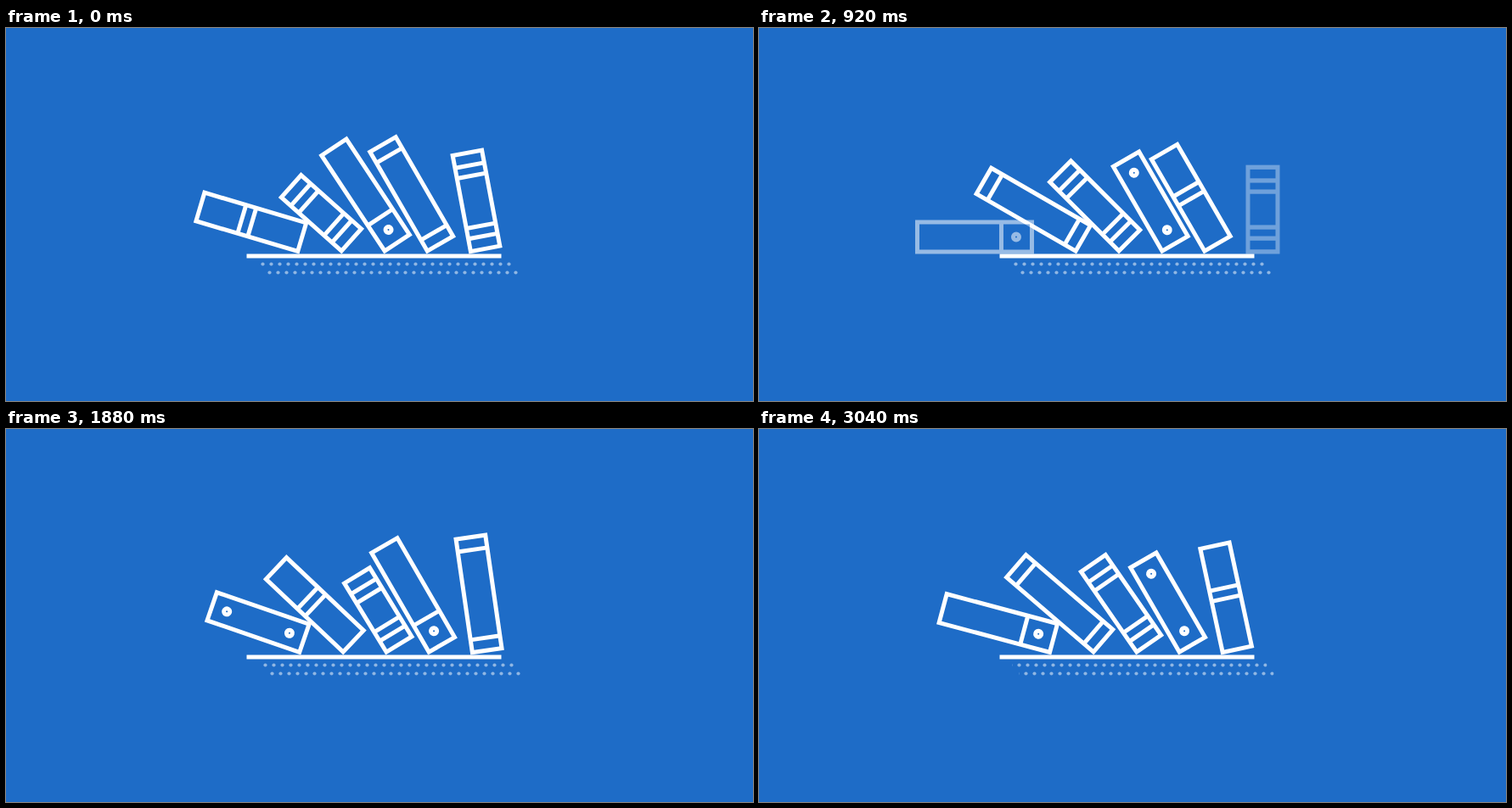
An HTML page for the animation above (3140 ms loop, 880 by 440 pixels).

```html
<!DOCTYPE html>
<html lang="en">
<head>
<meta charset="utf-8">
<title>Bookshelf loader</title>
<style>
  html, body { margin: 0; width: 100%; height: 100%; overflow: hidden; background: #1e6cc7; }
  svg { display: block; }
  .cover { fill: #1e6cc7; stroke: #fff; stroke-width: 5; }
  .ring { fill: none; stroke: #fff; stroke-width: 5; }
</style>
</head>
<body>
<svg id="stage" width="880" height="440" viewBox="0 0 880 440"></svg>
<script>
const LOOP = 3140;
const REST = 100;        // still time at the end of the loop
const START = .1265;     // progress of the second book at time 0
const SPEED = .00044;    // progress per ms
const SHELF = { x: 283.5, y: 266.5, width: 300, height: 5 };

// Decorations are measured down from the top of the book.
const mirror = (h, size, tops) => tops.flatMap(y => [y, h - size - y]);
const BOOKS = [
  { h: 140, bars: mirror(140, 5, [15]) },
  { h: 120, bars: mirror(120, 5, [15, 27.5]) },
  { h: 120, rings: mirror(120, 0, [21]) },
  { h: 130, bars: [51, 63.5] },
  { h: 100, bars: mirror(100, 5, [15, 27.5]) },
  { h: 140, bars: [99], rings: [119] }
];

const ramp = (p, from, to) => Math.min(1, Math.max(0, (p - from) / (to - from)));

// Pose of a book at progress p from 0 to 1
function pose(p) {
  const lift = ramp(p, 0, .065) - ramp(p, .065, .088);
  return {
    x: SHELF.width * (1 - p) - lift,
    angle: -30 * ramp(p, .1, .176) - 15 * ramp(p, .45, .495)
      - 15 * ramp(p, .615, .67) - 30 * ramp(p, .76, .835),
    stretch: 1 + .1 * lift,
    alpha: ramp(p, 0, .088) * (1 - ramp(p, .835, .9))
  };
}

function add(parent, tag, attrs = {}) {
  const el = document.createElementNS('http://www.w3.org/2000/svg', tag);
  for (const key in attrs) el.setAttribute(key, attrs[key]);
  return parent.appendChild(el);
}

const stage = document.getElementById('stage');

const books = BOOKS.map(({ h, bars = [], rings = [] }) => {
  const g = add(stage, 'g');
  add(g, 'rect', { class: 'cover', x: 2.5, y: 2.5 - h, width: 35, height: h - 5 });
  for (const y of bars) add(g, 'rect', { fill: '#fff', x: 4, y: y - h, width: 32, height: 5 });
  for (const y of rings) add(g, 'circle', { class: 'ring', cx: 20, cy: y - h, r: 3.5 });
  return g;
});

add(stage, 'rect', { ...SHELF, fill: '#fff' });

// Two dotted rows sliding inside fixed windows
function dotRow(x, y) {
  const view = add(stage, 'svg', { ...SHELF, x, y, overflow: 'hidden' });
  const g = add(view, 'g', { fill: '#fff', 'fill-opacity': .5 });
  for (let cx = -5; cx <= 305; cx += 10) add(g, 'circle', { cx, cy: 2.5, r: 2.12 });
  return g;
}
const rows = [dotRow(298.5, 276), dotRow(306.5, 286)];

function draw(ms) {
  const travel = START + SPEED * Math.min(ms, LOOP - REST);
  books.forEach((g, i) => {
    const { x, angle, stretch, alpha } = pose((travel + (1 - i) / 6 + 1) % 1);
    g.setAttribute('transform',
      `translate(${SHELF.x + x} ${SHELF.y}) rotate(${angle}) scale(1 ${stretch})`);
    g.setAttribute('opacity', alpha);
  });

  // Dots run ten tiles per journey, in whole pixels.
  const drift = Math.round(travel * 100 - 3.7) % 10;
  for (const g of rows) g.setAttribute('transform', `translate(${drift} 0)`);
}

const begin = performance.now();
function frame() {
  draw((performance.now() - begin) % LOOP);
  requestAnimationFrame(frame);
}
draw(0);
requestAnimationFrame(frame);
</script>
</body>
</html>
```
